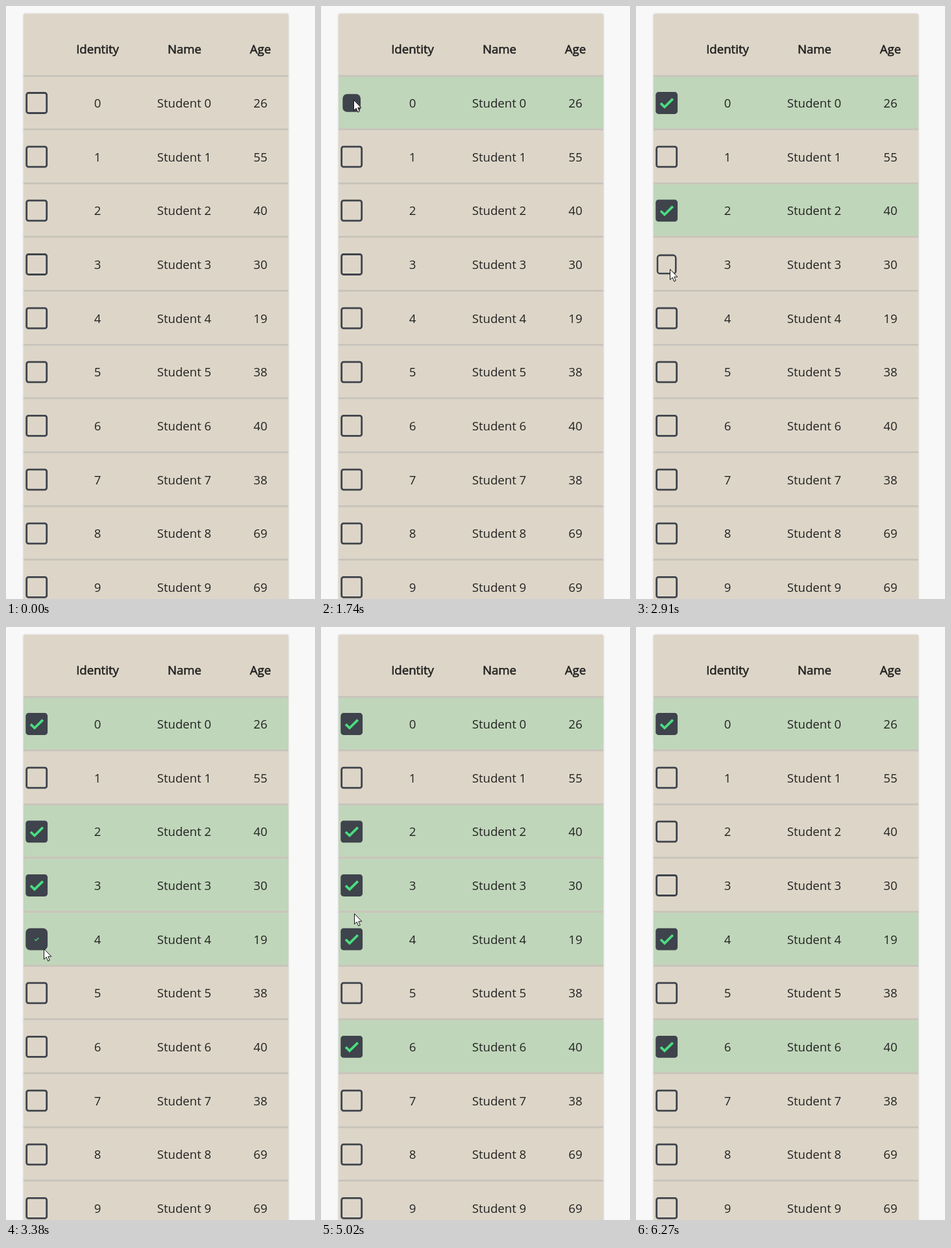
These frames come from a looping animation (476x911 px, 6670 ms). An HTML page with a canvas:

```html
<!DOCTYPE html>
<html lang="en">
<head>
<meta charset="utf-8">
<title>Selectable table</title>
<style>
  html, body { margin: 0; width: 100%; height: 100%; overflow: hidden; background: #f8f8f8; }
  canvas { display: block; }
</style>
</head>
<body>
<canvas id="stage" width="476" height="911"></canvas>
<script>
const ctx = document.getElementById('stage').getContext('2d');
const LOOP = 6670;
const SAND = '#ddd6c8', MINT = '#c0d6ba', RULE = '#c9c5bb', SLATE = '#3f434c', TICK = '#4ade80';
const TOP = 107, ROW = 82.66;
const ages = [26, 55, 40, 30, 19, 38, 40, 38, 69, 69];

const toTick = ms => Math.floor(ms < 4458 ? (ms - 104) / 68 : 64 + (ms - 4457) / 69.6);
const clamp = (v, lo, hi) => Math.min(hi, Math.max(lo, v));

// Each click toggles a row when the button is released.
const clicks = [
  { row: 0, at: 24 }, { row: 2, at: 36 }, { row: 3, at: 43 }, { row: 4, at: 47 },
  { row: 6, at: 67 }, { row: 3, at: 77 }, { row: 2, at: 80 }
];

// Pointer strokes: start, end, and the point reached; it rests in between.
const entry = [415, 813], leave = 90;
const strokes = [
  [0, 3, 270, 392], [6, 9, 156, 249], [11, 17, 50, 144],
  [24, 34, 46, 320], [36, 40, 52, 404], [44, 48, 58, 494], [48, 60, 53, 652],
  [67, 77, 50, 369], [77, 80, 51, 320], [80, 83, 146, 418], [83, 89, 443, 903]
];

function pointerAt(tick) {
  let [x, y] = entry;
  for (const [from, to, toX, toY] of strokes) {
    const p = clamp((tick - from) / (to - from), 0, 1);
    const eased = 1 - (1 - p) ** 2;
    x += (toX - x) * eased;
    y += (toY - y) * eased;
  }
  return [Math.round(x), Math.round(y)];
}

function rect(x, y, w, h, color) {
  ctx.fillStyle = color;
  ctx.fillRect(x, y, w, h);
}

function poly(points) {
  ctx.beginPath();
  points.forEach(([x, y]) => ctx.lineTo(x, y));
}

function text(label, x, y, bold) {
  ctx.font = '18.6px "Open Sans", sans-serif';
  ctx.textAlign = 'center';
  ctx.fillStyle = ctx.strokeStyle = '#222';
  ctx.fillText(label, x, y);
  if (bold) {
    ctx.lineWidth = .6;
    ctx.strokeText(label, x, y);
  }
}

// age: ticks since the button was released, negative while it is held
function checkbox(y, checked, age) {
  const scale = age > 0 ? 1 : 1 - .09 * clamp(age + 3, 0, 2);
  const radius = 3 + 4 * Math.max(0, 1 - Math.abs(age) / 3);
  ctx.save();
  ctx.translate(47.2, y);
  ctx.scale(scale, scale);
  ctx.beginPath();
  ctx.roundRect(-15.5, -15.5, 31, 31, radius);
  ctx.strokeStyle = ctx.fillStyle = SLATE;
  ctx.lineWidth = 2.8;
  ctx.stroke();
  if (checked) {
    const size = age < 0 ? 1 : Math.min(1, age / 3);
    ctx.fill();
    ctx.scale(size, size);
    poly([[-9.2, .4], [-3.2, 6.2], [9.6, -6.4]]);
    ctx.strokeStyle = TICK;
    ctx.lineWidth = 3.7;
    ctx.stroke();
  }
  ctx.restore();
}

function drawRow(i, tick) {
  const y = TOP + i * ROW, mid = y + 42, base = Math.round(mid + 7);
  const own = clicks.filter(c => c.row === i);
  const checked = own.filter(c => c.at <= tick).length % 2 === 1;
  const active = own.find(c => Math.abs(tick - c.at) < 3);

  if (checked) rect(27, y, 408, ROW, MINT);
  checkbox(mid, checked, active ? tick - active.at : 3);
  text(i, 141, base);
  text('Student ' + i, 274.5, base);
  text(ages[i], 392, base);
}

function drawPointer(x, y) {
  ctx.save();
  ctx.translate(x + .5, y + .5);
  poly([[0, 0], [0, 16], [3.7, 12.6], [6.2, 18.6], [8.8, 17.5], [6.3, 11.7], [11.3, 11.7]]);
  ctx.closePath();
  ctx.fillStyle = '#fff';
  ctx.strokeStyle = '#111';
  ctx.lineWidth = 1;
  ctx.fill();
  ctx.stroke();
  ctx.restore();
}

function draw(ms) {
  const tick = toTick(ms);
  rect(0, 0, 476, 911, '#f8f8f8');

  ctx.save();
  ctx.shadowColor = 'rgba(0,0,0,.22)';
  ctx.shadowBlur = 3;
  ctx.fillStyle = SAND;
  ctx.beginPath();
  ctx.roundRect(27, 12, 408, 920, 3);
  ctx.fill();
  ctx.restore();

  text('Identity', 141, 73, true);
  text('Name', 275, 73, true);
  text('Age', 392, 73, true);
  ages.forEach((_, i) => drawRow(i, tick));
  ages.forEach((_, i) => rect(27, Math.round(TOP + i * ROW - 1.5), 408, 3, RULE));

  if (tick >= 0 && tick < leave) drawPointer(...pointerAt(tick));
}

const start = performance.now();
function loop() {
  draw((performance.now() - start) % LOOP);
  requestAnimationFrame(loop);
}
loop();
</script>
</body>
</html>
```
